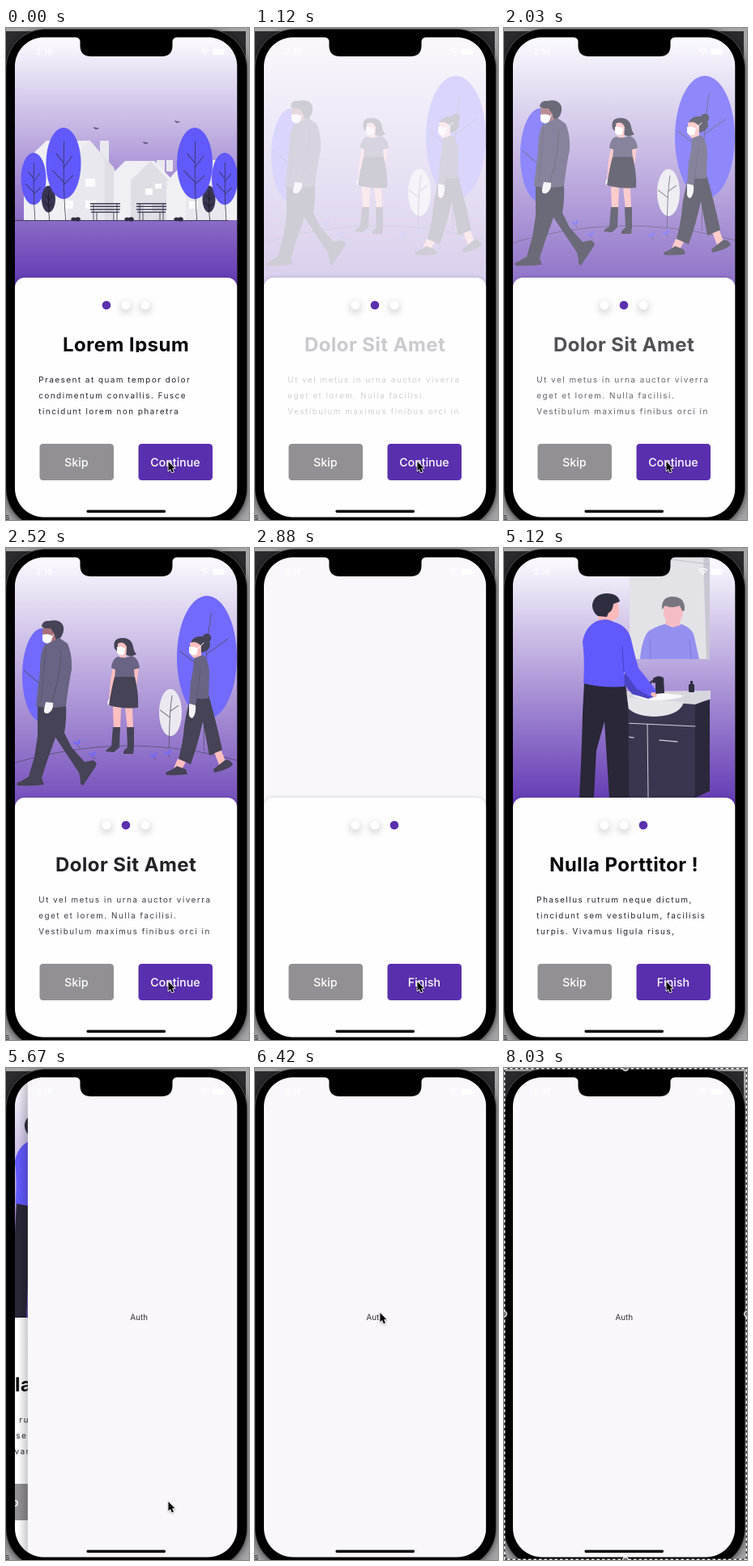
These frames come from a looping animation (300 by 607 pixels, 9150 ms). An HTML page with a canvas:

```html
<!DOCTYPE html>
<html lang="en">
<head>
<meta charset="utf-8">
<title>Onboarding</title>
<style>
html, body { margin: 0; width: 100%; height: 100%; overflow: hidden; background: #000; }
canvas { display: block; width: 300px; height: 607px; }
</style>
</head>
<body>
<canvas id="stage"></canvas>
<script>
const W = 300, H = 607, LOOP = 9150;
const S = Math.max(2, window.devicePixelRatio || 1);
const SCREEN = { x: 11, y: 11.5, w: 274.3, h: 592 };
const CARD_Y = 308;
const PURPLE = '#5a2fae', BLUE = '#6159fc', DARK = '#2f2e41', SLATE = '#3f3d56', PAPER = '#f9f7fb';
const JACKET = '#575274', SKIN = '#ffb9b9', GLOVE = '#f5f2f6';
const FONT = 'Inter, Roboto, sans-serif';

// When each page appears and when the last one is pushed away
const TAPS = [-9000, 800, 2865];
const FADE = 2350, PUSH = 5450, PUSH_TIME = 400;

const PAGES = [
  { title: 'Lorem Ipsum', draw: town, button: 'Continue',
    lines: ['Praesent at quam tempor dolor', 'condimentum convallis. Fusce', 'tincidunt lorem non pharetra'] },
  { title: 'Dolor Sit Amet', draw: walkers, button: 'Continue',
    lines: ['Ut vel metus in urna auctor viverra', 'eget et lorem. Nulla facilisi.', 'Vestibulum maximus finibus orci in'] },
  { title: 'Nulla Porttitor !', draw: washroom, button: 'Finish',
    lines: ['Phasellus rutrum neque dictum,', 'tincidunt sem vestibulum, facilisis', 'turpis. Vivamus ligula risus,'] },
];

function layer(canvas = document.createElement('canvas')) {
  canvas.width = Math.round(W * S);
  canvas.height = Math.round(H * S);
  const ctx = canvas.getContext('2d');
  ctx.scale(S, S);
  return ctx;
}

const screenCtx = layer(document.getElementById('stage'));
let c = screenCtx;

// Drawing helpers
function fill(d, color) { c.fillStyle = color; c.fill(new Path2D(d)); }
function line(d, color, width = 0.8) {
  c.strokeStyle = color;
  c.lineWidth = width;
  c.lineCap = c.lineJoin = 'round';
  c.stroke(new Path2D(d));
}
function oval(x, y, rx, ry, color, turn = 0) {
  c.fillStyle = color;
  c.beginPath();
  c.ellipse(x, y, rx, ry, turn, 0, Math.PI * 2);
  c.fill();
}
function rect(x, y, w, h, color) { c.fillStyle = color; c.fillRect(x, y, w, h); }
function round(x, y, w, h, r, color) {
  c.fillStyle = color;
  c.beginPath();
  c.roundRect(x, y, w, h, r);
  c.fill();
}
function text(str, x, y, size, color, { weight = 400, gap = 0, align = 'left' } = {}) {
  c.font = `${weight} ${size}px ${FONT}`;
  c.letterSpacing = gap + 'px';
  c.textAlign = align;
  c.fillStyle = color;
  c.fillText(str, x, y);
  c.letterSpacing = '0px';
}
function shadow(color, blur, dy) {
  c.shadowColor = color;
  c.shadowBlur = blur * S;
  c.shadowOffsetY = dy * S;
}
function shaded(color, blur, dy, draw) {
  c.save();
  shadow(color, blur, dy);
  draw();
  c.restore();
}
function clipped(x, y, w, h, draw, r = 0) {
  c.save();
  c.beginPath();
  c.roundRect(x, y, w, h, r);
  c.clip();
  draw();
  c.restore();
}

// Timing helpers
const clamp = v => Math.min(1, Math.max(0, v));
function bezier(x1, y1, x2, y2) {
  const at = (a, b, s) => 3 * a * s * (1 - s) ** 2 + 3 * b * s * s * (1 - s) + s ** 3;
  return t => {
    if (t <= 0 || t >= 1) return clamp(t);
    let lo = 0, hi = 1;
    for (let i = 0; i < 24; i++) {
      const mid = (lo + hi) / 2;
      if (at(x1, x2, mid) < t) lo = mid; else hi = mid;
    }
    return at(y1, y2, lo);
  };
}
const easeOut = bezier(0, 0, 0.58, 1);
const easeInOut = bezier(0.42, 0, 0.58, 1);
const pushEase = bezier(0.35, 0.91, 0.33, 0.97);

// Page 1: houses, trees and benches
function tree(x, y, rx, ry, color) {
  oval(x, y, rx, ry, color);
  const ink = color === BLUE ? DARK : '#17161f';
  line(`M${x + rx * .04} ${y - ry * .62} Q${x - rx * .05} ${y + ry * .5} ${x + rx * .12} 237
    M${x} ${y + ry * .12} L${x + rx * .5} ${y - ry * .2}
    M${x} ${y - ry * .02} L${x - rx * .42} ${y - ry * .27}
    M${x} ${y + ry * .52} L${x - rx * .62} ${y + ry * .2}
    M${x} ${y + ry * .6} L${x + rx * .55} ${y + ry * .34}`, ink, 0.7);
}
function bench(x) {
  for (const y of [216, 219.5, 223]) rect(x, y, 37, 1.5, SLATE);
  rect(x + 1, 226.5, 35, 1.4, SLATE);
  line(`M${x + 4} 217V237M${x + 33} 217V237M${x + 8} 228V237M${x + 29} 228V237`, SLATE, 0.9);
}
function windowPane(x, y, w = 11, h = 9) { rect(x, y, w, h, '#fbfbfd'); }
function town() {
  const wall = '#e9e8ee', face = '#dfdee4', roof = '#f0eff4';
  rect(116, 139, 11, 30, wall);
  fill('M22 237V166L50 139H103L133 172V237Z', roof);
  fill('M76 237V168L103 138L131 170V237Z', wall);
  fill('M103 138L134 174V237H122V162Z', face);
  rect(186, 163, 10, 14, wall);
  rect(198, 163, 8, 14, wall);
  fill('M133 237V178L147 164H183L210 192V237Z', roof);
  fill('M154 237V188L178 164L203 190V237Z', face);
  rect(253, 166, 8, 20, wall);
  fill('M198 237V190L222 163H258L286 192V237Z', roof);
  fill('M222 237V190L246 165L272 192V237Z', wall);
  windowPane(98, 186, 12, 10);
  windowPane(72, 213, 11, 10);
  windowPane(98, 213, 12, 10);
  windowPane(172, 198, 9, 8);
  windowPane(170, 218, 10, 8);
  windowPane(184, 192, 8, 6);
  windowPane(226, 214, 11, 9);
  line('M11 237.5H274', SLATE, 1);
  bench(104);
  bench(161);
  for (const x of [86, 152, 213]) {
    oval(x - 2.5, 236, 3.2, 2.4, DARK);
    oval(x + 2.5, 236, 3.4, 2.8, DARK);
  }
  tree(34, 186, 15.5, 32, BLUE);
  tree(52.5, 211, 8.5, 16.5, '#393552');
  tree(71, 167, 21.5, 44, BLUE);
  tree(250.5, 211, 8, 16.5, '#393552');
  tree(270, 186, 16, 32, BLUE);
  tree(233, 167, 22, 44, BLUE);
  for (const [x, y] of [[111, 124], [172, 142], [211, 116]])
    line(`M${x - 2.5} ${y - .8}Q${x - .5} ${y - 1.6} ${x} ${y + .8}Q${x + 1} ${y - .8} ${x + 3} ${y}`, DARK, 0.9);
}

// Page 2: three people walking
function leafTree(x, y, rx, ry, color, ink, foot) {
  oval(x, y, rx, ry, color);
  line(`M${x + rx * .15} ${y - ry * .72}Q${x - rx * .12} ${y} ${x - rx * .1} ${foot}
    M${x - rx * .02} ${y - ry * .05}L${x + rx * .7} ${y - ry * .3}
    M${x - rx * .08} ${y + ry * .2}L${x - rx * .9} ${y - ry * .1}`, ink, 0.8);
}
function flower(x, y) {
  line(`M${x} ${y}q2 3 5 5`, SLATE, 0.6);
  oval(x, y, 3, 1.5, BLUE, 0.7);
  oval(x + 4, y - 1.5, 1.4, 3, BLUE, 0.3);
}
function walkers() {
  leafTree(45, 157, 25, 58, BLUE, SLATE, 258);
  leafTree(248, 135, 37, 76, BLUE, SLATE, 250);
  leafTree(203, 203, 14, 29, '#e9e8ee', SLATE, 247);
  line('M11 265Q80 245 148 244Q220 244 285 262', SLATE, 0.8);
  for (const [x, y] of [[86, 241], [105, 255], [180, 256], [198, 253]]) flower(x, y);

  // Man
  fill('M50 194L74 192Q75 212 72 228L81 246L97 264L107 262Q113 264 111 269L95 293Q91 292 92 286L90 277L60 232Z', DARK);
  fill('M39 192L73 194Q71 216 61 234L51 262L44 284L47 292Q30 294 14 293Q12 289 18 288L28 282L35 258L39 232Z', DARK);
  oval(53, 104, 8, 10, '#a0616a');
  fill('M51 108L65 104L66 120L54 122Z', '#a0616a');
  fill('M45 107Q53 105 58 109L55 117Q48 119 45 114Z', '#fff');
  line('M57 109L64 102', '#fff', 0.8);
  fill('M44 97Q45 89 54 90Q67 87 71 97Q72 105 67 111L62 113L59 105L55 99Q48 100 44 97Z', DARK);
  fill('M53 117L66 111L76 118Q82 132 81 150Q77 170 74 195Q56 199 37 195L42 152Q42 130 47 121Z', JACKET);
  line('M67 126Q69 150 57 188', SLATE, 0.8);
  line('M49 122L43 190', SLATE, 0.6);
  fill('M49 190L58 191Q59 200 52 204Q46 205 47 199Z', GLOVE);

  // Girl
  fill('M132 196L142 196L141 224H133ZM147 196H156L157 224H150Z', SKIN);
  fill('M132 221H141L140 246L133 252L123 251Q124 248 130 245ZM149 221H158V246L157 254H145Q144 250 150 246Z', DARK);
  fill('M133 142L137 150L134 172L132 188L127 187L129 164ZM157 142L164 146L161 172L158 188L153 187L155 172Z', SKIN);
  fill('M127 186L132 187L131 193L127 195L125 191ZM153 186L158 187L157 194L153 194Z', GLOVE);
  fill('M134 124Q131 111 144 111Q155 111 157 122Q158 128 161 131Q154 135 149 132L141 132Z', DARK);
  fill('M138 118Q145 114 149 122L148 136L142 137L138 128Z', SKIN);
  fill('M137 122Q143 121 147 124L146 131Q140 134 137 129Z', '#fff');
  fill('M138 134Q147 137 154 133Q163 134 165 148L158 150L159 162H134L135 150L130 148Q131 137 138 134Z', JACKET);
  fill('M134 159H159Q164 180 163 197Q145 199 127 194Q130 174 134 159Z', DARK);

  // Woman
  fill('M212 260L222 264L217 273L206 274ZM257 252L266 250L272 266L264 270Z', SKIN);
  fill('M197 277Q205 274 211 269L222 273L224 279Q209 281 198 280ZM256 273L270 262Q276 260 280 267Q276 273 257 277Z', DARK);
  fill('M229 181L250 181Q259 212 267 249L251 256Q247 235 243 214Q237 242 228 267L213 260Q219 238 220 220Q223 199 229 181Z', DARK);
  oval(248, 111, 5.3, 5.3, DARK);
  oval(240, 119, 12, 10, DARK);
  fill('M227 117Q235 114 241 121L241 135L234 138L228 132Z', SKIN);
  fill('M226 122Q232 121 237 124L235 132Q228 133 226 129Z', '#fff');
  line('M237 124L244 117', '#fff', 0.8);
  fill('M232 136L243 132Q250 137 251 153L250 185Q239 188 228 183L230 164Z', JACKET);
  fill('M233 140Q242 143 239 160L234 194L226 192L228 166Z', JACKET);
  line('M240 148L235 190', SLATE, 0.6);
  fill('M226 192L234 194Q235 205 230 210Q225 209 226 202Z', GLOVE);
}

// Page 3: man at a washbasin
function washroom() {
  fill('M155 11H246L251 137H155Z', '#e3e2e7');
  fill('M246 11H254V138H250Z', '#c9c7d2');
  line('M180 11L254 20', '#b8b6c2', 0.8);
  fill('M168 137Q170 113 178 103Q187 97 198 94L219 94Q230 98 234 106L241 137Z', '#9490ef');
  line('M180 113L181 137M229 114L231 137', '#7773cf', 0.7);
  fill('M197 72Q199 66 209 67Q221 68 221 78Q220 87 217 90L218 95L208 98L199 94L200 89Q196 83 197 72Z', '#f5bcc4');
  fill('M195 76Q194 60 208 60Q224 60 223 77L220 78L217 71Q206 75 199 71Z', '#77757f');

  fill('M151 188L236 192V308H150Z', '#3a3650');
  fill('M236 192L254 187V300L236 308Z', '#2b283c');
  line('M150 216L236 220M177 217L178 308', '#d5d3de', 1);
  line('M192 237L214 239M153 233L160 234', '#d5d3de', 1.2);
  fill('M147 177L255 176V186L236 193L147 186Z', '#d7d6dd');
  fill('M147 184Q150 207 185 208Q217 207 222 190Z', '#e5e4e9');
  fill('M159 183Q187 176 222 182Q214 188 180 188Z', '#f8f7fb');
  fill('M187 180V166Q183 169 184 161Q190 156 197 160L198 179Z', DARK);
  line('M184 164Q180 165 181 169', DARK, 2);
  round(228, 168, 7, 10, 1.5, DARK);
  rect(230, 164, 3, 5, DARK);

  fill('M125 205L128 168H150L154 200L155 308H131Z', '#353246');
  fill('M99 166L150 171L153 206L154 308H130L124 214L114 250L111 308H93Q96 250 97 204Z', '#2a2738');
  fill('M117 78L134 80L134 94L116 95Z', SKIN);
  fill('M122 64H140Q143 76 141 85Q136 90 126 88Z', SKIN);
  fill('M109 70Q111 57 126 56Q141 56 143 66L135 69Q134 78 129 80L127 85L116 84Q109 79 109 70Z', DARK);
  fill('M149 154L167 171L187 183L178 186L158 180L147 166Z', '#4a44c4');
  fill('M115 90Q127 86 135 91Q153 96 157 113Q161 131 166 148L188 176L182 184L164 174L148 152L149 171Q122 173 98 167Q100 138 97 116Q100 97 115 90Z', BLUE);
  line('M146 122L148 153', '#403ab5', 0.8);
  oval(185, 181, 4, 2.6, SKIN, 0.5);
}

// Every page's fading parts are composed once, then drawn with one opacity
function compose(page) {
  const target = c;
  c = layer();
  const sky = c.createLinearGradient(0, 11, 0, CARD_Y + 18);
  sky.addColorStop(0, '#fdfcff');
  sky.addColorStop(1, '#5e33b1');
  rect(SCREEN.x, 11, SCREEN.w, CARD_Y + 12 - 11, sky);
  clipped(SCREEN.x, 11, SCREEN.w, CARD_Y + 1, page.draw);
  const picture = c.canvas;
  c = layer();
  clipped(SCREEN.x, 370, SCREEN.w, 30, () =>
    text(page.title, 148.1, 399, 24, '#08070b', { weight: 700, gap: 0.42, align: 'center' }));
  clipped(SCREEN.x, 420, SCREEN.w, 58.5, () =>
    page.lines.forEach((s, i) => text(s, 40.3, 437.3 + i * 19.6, 9.84, '#1f1e22', { gap: 1.52 })));
  page.layers = [picture, c.canvas];
  c = target;
}

function button(x, label, color) {
  round(x, 513, 91.5, 45, 4, color);
  text(label, x + 45.4, 541, 14.2, '#fff', { weight: 500, align: 'center' });
}

function dot(x, active) {
  if (active) oval(x, 342, 5.3, 5.3, PURPLE);
  else shaded('rgba(0,0,0,.28)', 10, 3, () => oval(x, 342, 5.4, 5.4, '#fff'));
}

function intro(t) {
  const index = TAPS.findLastIndex(tap => t >= tap);
  const page = PAGES[index];
  const alpha = easeOut(clamp((t - TAPS[index] - 15) / FADE));
  const show = part => {
    c.globalAlpha = alpha;
    c.drawImage(part, 0, 0, W, H);
    c.globalAlpha = 1;
  };
  rect(SCREEN.x, 11, SCREEN.w, 594, PAPER);
  show(page.layers[0]);
  shaded('rgba(0,0,0,.14)', 5, -0.5, () =>
    round(SCREEN.x, CARD_Y, SCREEN.w, 310, [12, 12, 0, 0], '#fffeff'));
  for (let i = 0; i < 3; i++) dot(124 + i * 24, i === index);
  show(page.layers[1]);
  button(41.5, 'Skip', '#929094');
  button(163.5, page.button, PURPLE);
}

function auth(x) {
  if (x > 0) {
    const edge = c.createLinearGradient(SCREEN.x + x - 12, 0, SCREEN.x + x, 0);
    edge.addColorStop(0, 'rgba(0,0,0,0)');
    edge.addColorStop(1, 'rgba(0,0,0,.2)');
    rect(SCREEN.x + x - 12, 11, 12, 594, edge);
  }
  rect(SCREEN.x + x, 11, SCREEN.w, 594, PAPER);
  text('Auth', 148.3 + x, 311, 9.7, '#2b2a2e', { gap: 0.1, align: 'center' });
}

function statusBar() {
  text('2:16', 36.5, 33, 10.5, 'rgba(255,255,255,.9)', { weight: 600 });
  const white = 'rgba(255,255,255,.95)';
  line('M240.5 27.5Q245.5 23.5 250.5 27.5M242.5 30Q245.5 27.6 248.5 30', white, 1.5);
  oval(245.5, 32, 1.3, 1.2, white);
  round(255, 25.5, 14, 7.5, 2, white);
  rect(269.8, 28, 1, 2.5, white);
}

function device() {
  rect(0, 0, W, H, '#a5a5a8');
  rect(0, 4, 296, 60, '#2c2c2e');
  text('s', -1.5, 607, 11, '#333');
  shaded('rgba(0,0,0,.6)', 9, 2, () => round(-0.5, 1, 298.5, 616, 49, '#48484b'));
  round(0.4, 1.9, 296.7, 614.2, 48.2, '#000');
}

function notch() {
  fill('M86 11H211V11.5Q205.5 12 205.5 17V21C205.5 31 201 35 191 35H106C96 35 91.5 31 91.5 21V17Q91.5 12 86 11.5Z', '#000');
  round(99.5, 594.6, 97.5, 3.4, 1.7, '#000');
}

function pointer(t) {
  if (t >= 8030) return;
  const up = easeInOut(clamp((t - 6135) / 285));
  const down = clamp((t - 7895) / 135) ** 1.6;
  const x = 200 - 46 * up - 71 * down;
  const y = 534.5 - 233 * up + 290 * down;
  c.save();
  c.translate(x, y);
  c.scale(0.9, 0.9);
  const arrow = 'M.5 .5V13.2L3.3 10.5L5.4 15.4L7.7 14.4L5.6 9.7H9.4Z';
  shadow('rgba(0,0,0,.3)', 2, 1);
  line(arrow, '#fff', 1.8);
  shadow('transparent', 0, 0);
  fill(arrow, '#000');
  c.restore();
}

function selection() {
  c.lineCap = 'butt';
  c.lineWidth = 1.4;
  c.strokeStyle = '#3a3a3c';
  c.strokeRect(0.7, 0.7, W - 1.4, H - 1.4);
  c.setLineDash([3.5, 3]);
  c.strokeStyle = '#f2f2f2';
  c.strokeRect(0.7, 0.7, W - 1.4, H - 1.4);
  c.setLineDash([]);
  for (const [x, y] of [[150, 0], [0, 303.5], [300, 303.5], [150, 607]]) {
    oval(x, y, 4, 4, '#f2f2f2');
    oval(x, y, 2.9, 2.9, '#77777a');
  }
}

function render(t) {
  device();
  clipped(SCREEN.x, SCREEN.y, SCREEN.w, SCREEN.h, () => {
    const push = pushEase(clamp((t - PUSH) / PUSH_TIME));
    if (push < 1) {
      c.save();
      c.translate(-push * SCREEN.w / 3, 0);
      intro(t);
      c.restore();
    }
    if (push > 0) auth((1 - push) * SCREEN.w);
    statusBar();
  }, 36);
  notch();
  if (t >= 7390) selection();
  pointer(t);
}

PAGES.forEach(compose);
const start = performance.now();
function tick() {
  render((performance.now() - start) % LOOP);
  requestAnimationFrame(tick);
}
tick();
</script>
</body>
</html>
```
